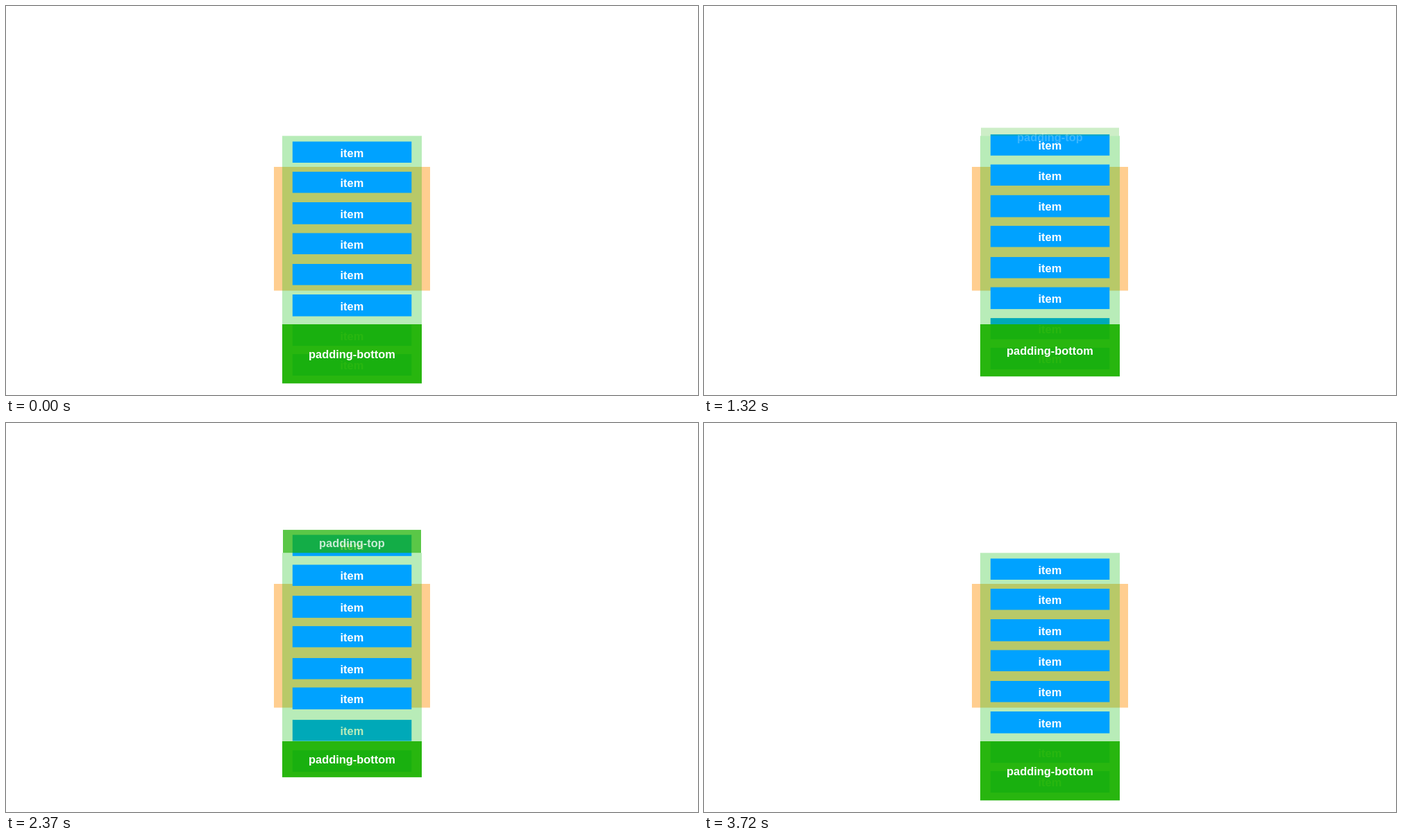
An HTML page with a canvas for the animation above (3750 ms loop, 997 by 561 pixels).

```html
<!DOCTYPE html>
<html lang="en">
<head>
<meta charset="utf-8">
<title>Virtual list scroll</title>
<style>
  html, body { margin: 0; width: 100%; height: 100%; overflow: hidden; background: #fff; }
  canvas { display: block; }
</style>
</head>
<body>
<canvas id="stage" width="997" height="561"></canvas>
<script>
const ctx = document.getElementById('stage').getContext('2d');
const LOOP = 3750, START = 270, END = 3420, RESET = 3720, STEP = 30;
const PADDING = 'rgba(27, 178, 0, .94)';

// top, height and travel of each list item
const items = [
  [195.5, 30.5, 44.5], [239, 30.5, 45], [283, 31.7, 44], [327.5, 30.5, 45],
  [372, 30.5, 43], [416, 31.5, 45], [459.6, 30.5, 41], [502, 31, 39]
];

// cubic-bezier(.42, 0, .58, 1)
function easeInOut(x) {
  let lo = 0, hi = 1;
  for (let i = 0; i < 24; i++) {
    const s = (lo + hi) / 2, r = 1 - s;
    if (1.26 * s * r * r + 1.74 * s * s * r + s * s * s < x) lo = s;
    else hi = s;
  }
  return lo * lo * (3 - 2 * lo);
}

function progress(time) {
  const t = Math.floor(time % LOOP / STEP) * STEP;
  if (t <= START || t >= RESET) return 0;
  return t >= END ? 1 : easeInOut((t - START) / (END - START));
}

function box(left, top, right, bottom, color) {
  ctx.fillStyle = color;
  ctx.fillRect(left, top, right - left, bottom - top);
}

function label(text, middle) {
  ctx.fillStyle = '#fff';
  ctx.fillText(text, 498.4, middle + 6);
}

function drawItem([top, height, travel], p) {
  const y = top - travel * p;
  box(412.8, y, 584.3, y + height, '#00a2ff');
  label('item', y + height / 2 + .8);
}

function draw(time) {
  const p = progress(time);
  ctx.clearRect(0, 0, 997, 561);
  ctx.font = 'bold 16.4px "Liberation Sans", Arial, sans-serif';
  ctx.textAlign = 'center';

  box(386, 232, 611, 410.5, '#ffce90');
  items.slice(6).forEach(item => drawItem(item, p));
  box(398, 187.3, 599, 459, 'rgba(0, 187, 0, .28)');
  items.slice(0, 6).forEach(item => drawItem(item, p));

  const bottom = 544.3 - 43.5 * p;
  box(398, 459, 599, bottom, PADDING);
  label('padding-bottom', (459 + bottom) / 2);

  ctx.globalAlpha = p;
  box(399, 184.9 - 40.1 * p, 598, 187.3, PADDING);
  label('padding-top', 196.2 - 30 * p);
  ctx.globalAlpha = 1;
}

const origin = performance.now();
function tick() {
  draw(performance.now() - origin);
  requestAnimationFrame(tick);
}
tick();
</script>
</body>
</html>
```
